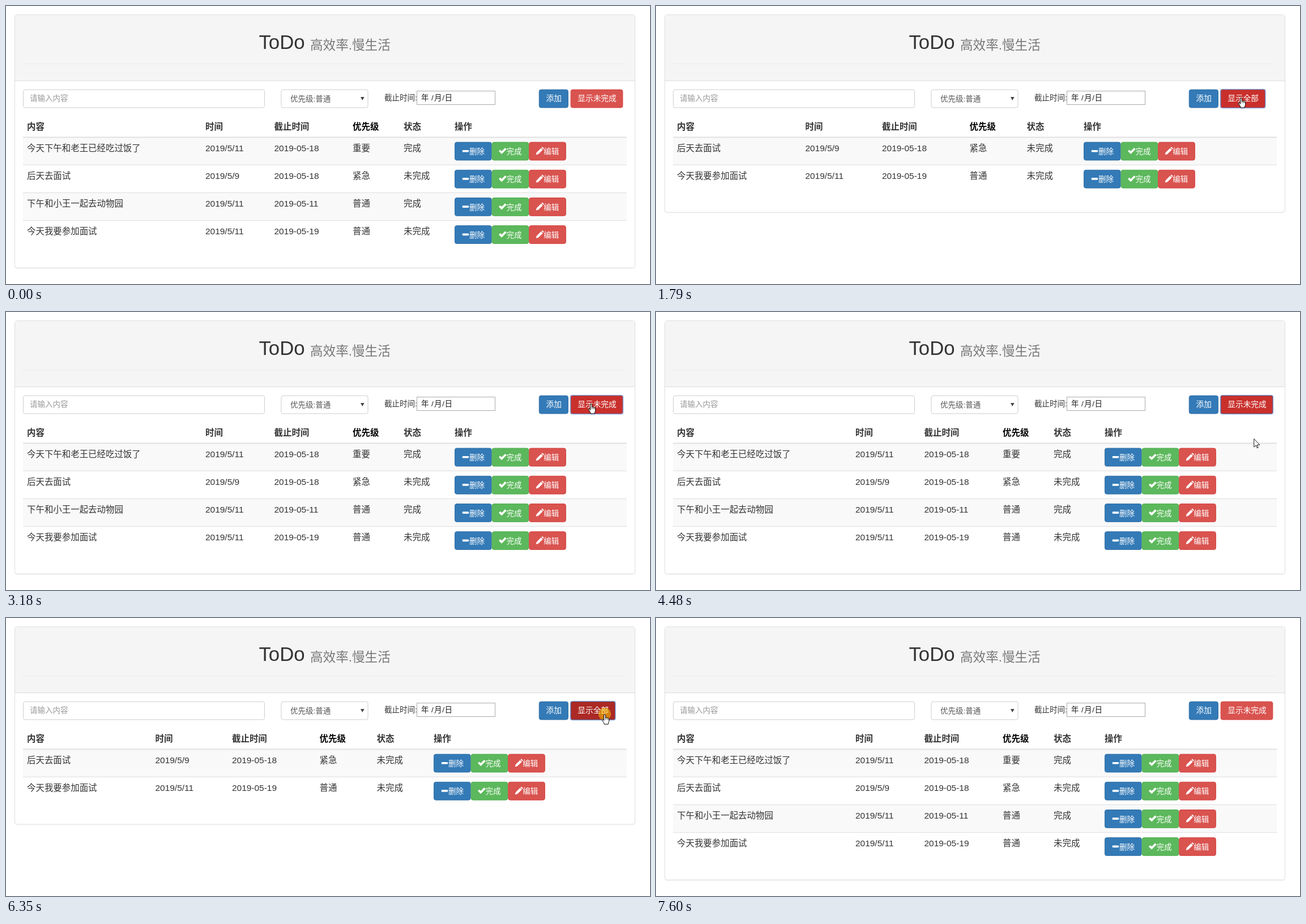
An HTML page that plays this animation: 1137x492 px, repeating every 7680 ms.

```html
<!DOCTYPE html>
<html lang="zh-CN">
<head>
<meta charset="utf-8">
<title>ToDo</title>
<style>
  html, body { margin: 0; width: 100%; height: 100%; overflow: hidden; background: #fff; }
  svg { display: block; width: 100%; height: 100%; }
  text { font-family: "Liberation Sans", "Noto Sans CJK SC", "Noto Sans CJK", sans-serif; white-space: pre; }
</style>
</head>
<body>
<svg id="stage" viewBox="0 0 1137 492" xmlns="http://www.w3.org/2000/svg"></svg>
<script>
const LOOP = 7680;
// The page is laid out in whole units and shown slightly reduced
const S = .965;
const CELL = 16 * S, CTRL = 14 * S, ROW = 51 * S, TALL = 34 * S;
const FORM_Y = 147.6, ROWS_Y = 232;
const BLUE = ['#337ab7', '#2e6da4'], GREEN = ['#5cb85c', '#4cae4c'], RED = ['#d9534f', '#d43f3a'];

const text = (x, y, s, size = CELL, fill = '#333', extra = '') =>
  `<text x="${x}" y="${y}" font-size="${size}" fill="${fill}" ${extra}>${s}</text>`;
// Box given by its outer edges, with a thin border inside them
const box = (x, y, w, h, fill, stroke, r = 3.4, extra = '') =>
  `<rect x="${x + S / 2}" y="${y + S / 2}" width="${w - S}" height="${h - S}" rx="${r}" fill="${fill}" stroke="${stroke}" stroke-width="${S}" ${extra}/>`;
const fillRect = (x, y, w, h, fill) =>
  `<rect x="${x}" y="${y}" width="${w}" height="${h}" fill="${fill}"/>`;
const path = (d, x = 0, y = 0, extra = 'fill="#fff"') =>
  `<path d="${d}" transform="translate(${x} ${y})" ${extra}/>`;

const ICONS = {
  minus: 'M2 5.2H11.6Q12.4 5.2 12.4 6V8Q12.4 8.8 11.6 8.8H2Q1.2 8.8 1.2 8V6Q1.2 5.2 2 5.2Z',
  ok: 'M-.2 7.3L2.4 4.7 5 7.2 10.9 1.2 13.5 3.7 5 12.3Z',
  pencil: 'M-.2 13.6L.9 9.6 8.8 1.7 11.9 4.8 4 12.6Z M9.6 .9L10.6 -.1Q11.2 -.5 11.8 .1L13.5 1.8Q14 2.4 13.5 3L12.7 4Z'
};

const ACTIONS = [['minus', '删除', BLUE], ['ok', '完成', GREEN], ['pencil', '编辑', RED]];

const actions = (x, y) => ACTIONS.map(([icon, label, [fill, stroke]], i) => {
  const left = x + i * 68 * S;
  return box(left, y, 68 * S, TALL, fill, stroke) +
    path(ICONS[icon], left + 12.6, y + 9.1) +
    text(left + 26, y + 21.5, label, CTRL, '#fff');
}).join('');

const HEADS = ['内容', '时间', '截止时间', '优先级', '状态', '操作'];
const TASKS = [
  ['今天下午和老王已经吃过饭了', '2019/5/11', '2019-05-18', '重要', '完成'],
  ['后天去面试', '2019/5/9', '2019-05-18', '紧急', '未完成'],
  ['下午和小王一起去动物园', '2019/5/11', '2019-05-11', '普通', '完成'],
  ['今天我要参加面试', '2019/5/11', '2019-05-19', '普通', '未完成']
];

function table(tasks, cols) {
  let out = HEADS.map((h, i) =>
    text(cols[i], 218.8, h, CELL, i === 3 ? '#000' : '#333', 'font-weight="700"')).join('');
  tasks.forEach((task, r) => {
    const top = ROWS_Y + r * ROW;
    if (r % 2 === 0) out += fillRect(30, top, 1066, ROW, '#f9f9f9');
    if (r) out += fillRect(30, top - .5, 1066, S, '#ddd');
    out += task.map((s, i) => text(cols[i], top + 24.8, s)).join('');
    out += actions(cols[5], top + 8.6);
  });
  return out + fillRect(30, 231.5, 1066, 1.7, '#ddd');
}

function view(id, tasks, cols, bottom) {
  return `<g id="${id}">` +
    box(15, 16, 1096, bottom - 15, 'none', '#000', 4, 'opacity=".06"') +
    box(15, 15, 1096, bottom - 15, '#fff', '#ddd', 4) +
    path('M16 132V19.5Q16 16 19.5 16H1106.5Q1110 16 1110 19.5V132Z', 0, 0, 'fill="#f5f5f5"') +
    fillRect(15, 132, 1096, 1, '#ddd') + fillRect(30, 102, 1066, 1, '#eee') +
    table(tasks, cols) + '</g>';
}

const header =
  text(446.5, 76.3, 'ToDo', 36 * S) + text(537, 76.6, '高效率.慢生活', 23.4 * S, '#777');

const form =
  box(30, FORM_Y, 427, TALL, '#fff', '#ccc') + text(42, 168, '请输入内容', CTRL, '#999') +
  box(485.5, FORM_Y, 154, TALL, '#fff', '#ccc') + text(502, 169, '优先级:普通', CTRL, '#555') +
  path('M626 161H632.6L629.3 167Z', 0, 0, 'fill="#444"') +
  text(668, 167.3, '截止时间:', CTRL) +
  box(725, 150, 139, 25, '#fff', '#a9a9a9', 0) +
  [[733, '年'], [751, '/'], [756, '月'], [770.3, '/'], [774.5, '日']]
    .map(([x, s]) => text(x, 167.3, s, CTRL, '#222')).join('') +
  box(940.8, FORM_Y, 54 * S, TALL, ...BLUE) + text(953.5, 168, '添加', 13.7, '#fff');

const BTN_X = 996.7;
const toggle =
  box(BTN_X, FORM_Y, 96 * S, TALL, ...RED, 3.4, 'id="btn"') +
  `<rect id="ring" x="${BTN_X}" y="${FORM_Y}" height="${TALL}" rx="3" fill="none" stroke="#6f97db" stroke-width="1.5" opacity=".8"/>` +
  text(1009.3, 168, '', 13.7, '#fff', 'id="label"');

const pointer =
  '<circle id="spot" r="11" fill="#ffd700" opacity=".5"/>' +
  '<g id="cursor" stroke="#000" stroke-linejoin="round">' +
  '<g id="hand">' +
  path('M-1.4 11.5V1.8C-1.4 .1 1.3 .1 1.3 1.8V7C1.5 5.6 3.9 5.8 3.9 7.2C4.3 6 6 6.4 6 7.6C6.5 6.8 7.7 7.2 7.7 8.4V12C7.7 14 6.4 15 6.2 18H-.8C-.9 15.5 -2.5 14.5 -4.4 10.8C-5.2 9.2 -3.4 8.6 -2.6 9.6Z') +
  path('M1.3 7V10M3.9 7.5V10M6 8V10', 0, 0, 'fill="none" stroke-width=".7"') + '</g>' +
  path('M.5 .5V15L3.9 11.9 6.2 16.8 8 16 5.8 11.2H10.6Z', 0, 0, 'id="arrow" fill="#fff" stroke-width=".9"') +
  '</g>';

document.getElementById('stage').innerHTML =
  view('all', TASKS, [37, 352, 473.5, 612, 702, 792], 464) +
  view('open', TASKS.filter(t => t[4] === '未完成'), [37, 263.5, 399, 553.5, 654.5, 755], 365.5) +
  header + form + toggle + pointer;

// Pointer moves: first step, last step, number of steps, target x, y
const MOVES = [
  [210, 210, 1, 1028.5, 383],
  [290, 930, 9, 1030, 187],
  [1000, 1080, 2, 1033, 177],
  [1160, 1310, 3, 1033, 162],
  [3640, 4020, 6, 1045, 342],
  [4100, 4330, 4, 1055, 246],
  [4410, 4640, 4, 1056, 158],
  [5730, 6040, 5, 1057, 176.5],
  [6190, 6190, 1, 1057, 170],
  [6590, 7130, 8, 1060, 495]
];
const PRESSES = [[1540, 1790], [2930, 3180], [4710, 4880], [6350, 6420]];
const FOCUS = [1540, 7600];

const within = (t, [a, b]) => t >= a && t < b;

function pointerAt(t) {
  let x = 1028.5, y = 500;
  for (const [start, end, n, tx, ty] of MOVES) {
    if (t < start) break;
    const gap = n > 1 ? (end - start) / (n - 1) : 1;
    const done = Math.min(n, Math.floor((t - start) / gap + 1e-6) + 1) / n;
    x += (tx - x) * done;
    y += (ty - y) * done;
    if (done < 1) break;
  }
  return { x, y };
}

const el = id => document.getElementById(id);
const [all, open, btn, ring, label, spot, cursor, hand, arrow] =
  ['all', 'open', 'btn', 'ring', 'label', 'spot', 'cursor', 'hand', 'arrow'].map(el);
const show = (node, on) => { node.style.display = on ? '' : 'none'; };

function draw(t) {
  const { x, y } = pointerAt(t);
  const filtered = PRESSES.filter(p => t >= p[1]).length % 2 === 1;
  const pressed = PRESSES.some(p => within(t, p));
  const focused = within(t, FOCUS);
  const hover = y < 177;

  show(all, !filtered);
  show(open, filtered);
  label.textContent = filtered ? '显示全部' : '显示未完成';

  const width = (filtered ? 82 : 96) * S;
  const [fill, stroke] = pressed ? ['#ac2925', '#761c19']
    : hover ? ['#c9302c', '#ac2925']
    : focused ? ['#c9302c', '#761c19'] : RED;
  btn.setAttribute('width', width - S);
  btn.setAttribute('fill', fill);
  btn.setAttribute('stroke', stroke);
  ring.setAttribute('width', width);
  show(ring, focused);

  const at = `translate(${x} ${y})`;
  cursor.setAttribute('transform', at);
  spot.setAttribute('transform', at);
  show(spot, pressed);
  show(hand, y < 180);
  show(arrow, y >= 180);
}

const begin = performance.now();
function frame() {
  draw((performance.now() - begin) % LOOP);
  requestAnimationFrame(frame);
}
draw(0);
requestAnimationFrame(frame);
</script>
</body>
</html>
```
